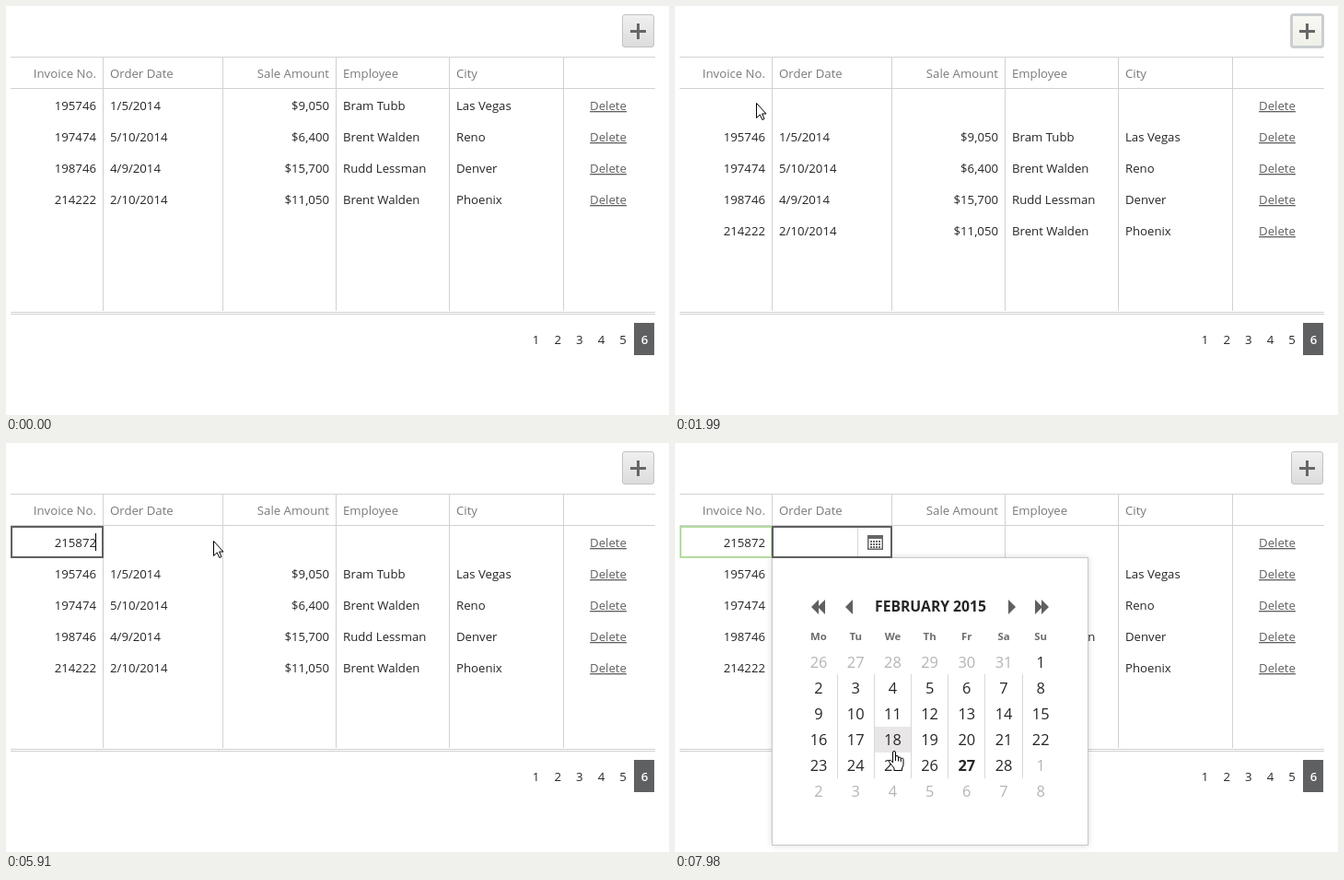
Animation, 720 px wide and 444 px high, one loop 8000 ms. Source, as an HTML page:

```html
<!DOCTYPE html>
<html lang="en">
<head>
<meta charset="utf-8">
<title>Invoice grid</title>
<style>
  html, body { margin: 0; width: 100%; height: 100%; overflow: hidden; background: #fff; }
  svg { display: block; width: 720px; height: 444px; cursor: default; }
  text { font: 13.2px "Open Sans", "Noto Sans", sans-serif; fill: #262626; white-space: pre; }
  .header { fill: #7a7a7a; }
  .link { fill: #5f6062; text-decoration: underline 1px; text-underline-offset: 1px; }
  .selected { fill: #fff; font-weight: 600; }
  .title { font-size: 15.7px; font-weight: 700; }
  .weekday { font-size: 11.4px; font-weight: 700; fill: #6d6d6d; }
  .day { font-size: 16.4px; }
  .other { fill: #b4b4b4; }
  .today { font-weight: 700; }
  .popup { filter: drop-shadow(0 0 3px rgba(0, 0, 0, .16)); }
</style>
</head>
<body>
<svg id="stage" viewBox="0 0 720 444">
  <defs>
    <linearGradient id="face" x2="0" y2="1">
      <stop stop-color="#f0f0f0"/><stop offset="1" stop-color="#dcdcdc"/>
    </linearGradient>
    <linearGradient id="faceHover" x2="0" y2="1">
      <stop stop-color="#f8f9f2"/><stop offset="1" stop-color="#eff0e8"/>
    </linearGradient>
  </defs>
</svg>
<script>
const LOOP = 8000;
const DARK = '#5f6062', LINE = '#d0d2d2';
const stage = document.getElementById('stage');

function add(parent, tag, attrs = {}, content) {
  const node = document.createElementNS('http://www.w3.org/2000/svg', tag);
  for (const key in attrs) node.setAttribute(key, attrs[key]);
  if (content !== undefined) node.textContent = content;
  return parent.appendChild(node);
}
const group = (parent = stage) => add(parent, 'g');
const box = (parent, x, y, width, height, fill, more) =>
  add(parent, 'rect', { x, y, width, height, fill, ...more });
const frame = (parent, x, y, width, height, stroke) =>
  box(parent, x + 1, y + 1, width - 2, height - 2, '#fff', { stroke, 'stroke-width': 2 });
const path = (parent, d, fill, more) => add(parent, 'path', { d, fill, ...more });
const label = (parent, x, y, content, anchor = 'start', cls = '') =>
  add(parent, 'text', { x, y, 'text-anchor': anchor, class: cls }, content);
const show = (node, visible) => node.setAttribute('display', visible ? 'inline' : 'none');

// Add button
const button = box(stage, 669.5, 9.5, 34, 35, 'url(#face)', { rx: 2.5 });
box(stage, 678, 26, 17, 3, '#666');
box(stage, 685, 19, 3, 17, '#666');

// Grid
const columns = [
  [98, 'end', 'Invoice No.'], [113, 'start', 'Order Date'], [351, 'end', 'Sale Amount'],
  [366, 'start', 'Employee'], [489, 'start', 'City'], [654, 'middle', '']
];
const orders = [
  ['195746', '1/5/2014', '$9,050', 'Bram Tubb', 'Las Vegas'],
  ['197474', '5/10/2014', '$6,400', 'Brent Walden', 'Reno'],
  ['198746', '4/9/2014', '$15,700', 'Rudd Lessman', 'Denver'],
  ['214222', '2/10/2014', '$11,050', 'Brent Walden', 'Phoenix']
];
for (const y of [55, 89, 332, 334]) box(stage, 5, y, 700, 1, LINE);
for (const x of [105, 235, 358, 481, 605]) box(stage, x, 55, 1, 276, LINE);
for (const [x, anchor, name] of columns) label(stage, x, 78, name, anchor, 'header');

const rows = group();
orders.forEach((order, r) => [...order, 'Delete'].forEach((value, c) =>
  label(rows, columns[c][0], 113 + 34 * r, value, columns[c][1], c === 5 ? 'link' : '')));
const newRowLink = label(stage, 654, 113, 'Delete', 'middle', 'link');

// Pager
box(stage, 682, 344, 22, 35, DARK);
for (let p = 1; p <= 6; p++)
  label(stage, 552 + 23.6 * p, 367, p, 'middle', p === 6 ? 'selected' : '');

// Calendar
const popup = group();
box(popup, 105.5, 124.5, 343, 312, '#fff', { stroke: '#c6c8c8', class: 'popup' });
label(popup, 277.5, 183, 'FEBRUARY 2015', 'middle', 'title');
const triangle = (x, dir) => path(popup, `M${x} 178l${8 * dir} -8v16z`, DARK);
[[148, 1], [155, 1], [185, 1], [370, -1], [399, -1], [406, -1]].forEach(t => triangle(...t));
const dayHover = box(popup, 0, 0, 40, 28, '#e9e6e8');
for (let c = 0; c < 7; c++) {
  const x = 156 + 40.2 * c;
  label(popup, x, 214, ['Mo', 'Tu', 'We', 'Th', 'Fr', 'Sa', 'Su'][c], 'middle', 'weekday');
  if (c) box(popup, Math.round(x - 20.7), 251, 1, 113, '#d8d8d8');
  for (let r = 0; r < 6; r++) {
    const date = new Date(2015, 0, 26 + c + 7 * r), day = date.getDate();
    const kind = date.getMonth() !== 1 ? ' other' : day === 27 ? ' today' : '';
    label(popup, x, 244 + 28 * r, day, 'middle', 'day' + kind);
  }
}

// Cell editors
const invoiceEditor = group();
const invoiceFocus = frame(invoiceEditor, 5, 90, 101, 35, DARK);
const invoiceValid = frame(invoiceEditor, 5, 90, 101, 35, '#b3dc9f');
const invoiceText = label(invoiceEditor, 98, 113, '', 'end');
const invoiceCaret = box(invoiceEditor, 97, 98, 1, 19, '#000');

const dateEditor = group();
frame(dateEditor, 105, 90, 131, 35, DARK);
box(dateEditor, 198, 92, 1, 31, '#d6d6d6');
box(dateEditor, 209.75, 100.75, 15.5, 14.5, '#fff', { stroke: '#666', 'stroke-width': 1.5 });
box(dateEditor, 209, 100, 17, 4, '#666');
for (let i = 0; i < 12; i++)
  box(dateEditor, 212 + 3 * (i % 4), 106 + 3 * Math.floor(i / 4), 2, 2, '#666');
const dateCaret = box(dateEditor, 113, 98, 1, 19, '#000');

// Mouse cursors, each drawn around its hot spot
const ink = { stroke: '#000', 'stroke-linejoin': 'round' };
const cursors = { arrow: group(), hand: group(), beam: group() };
path(cursors.arrow, 'M.5 .5V16.5L4.2 13L6.8 18.5L9 17.5L6.6 12H11Z', '#fff', ink);
path(cursors.hand, 'M-1.5 13V2a1.5 1.5 0 0 1 3 0V8V7a1.4 1.4 0 0 1 3 0v1.5a1.4 1.4 0 0 1 2.8 0v1' +
  'a1.3 1.3 0 0 1 2.7 0V15q0 2-1.5 4v2.5H0V19L-5.3 12.5q-.8-1.5.5-2.2 1.2-.4 3.3 2.7Z', '#fff', ink);
path(cursors.hand, 'M1.5 8v3M4.5 8.5v3M7.3 9.5v2.5', 'none', ink);
path(cursors.beam, 'M-3 -7.5h2.5l1 1l1 -1H4M.5 -6.5V7M-3 8h2.5l1 -1l1 1H4', 'none', { stroke: '#000' });

// start, end, from, to, vertical bow
const moves = [
  [630, 1120, [719, 209], [687, 24], 0],
  [1346, 2020, [687, 24], [88, 105], 34],
  [5190, 5970, [88, 105], [225, 106], 8],
  [6000, 6180, [225, 106], [219.5, 107], 0],
  [7470, 7980, [219.5, 107], [237.5, 334], 0]
];
const keyTimes = [3040, 3360, 3390, 3650, 3780, 4470];
const invoiceCaretTimes = [[2410, 2740], [3040, 4310], [4470, 4930], [5430, 6000]];
const dateCaretTimes = [[6180, 6480], [6710, 7490]];

const within = (t, spans) => spans.some(([from, to]) => t >= from && t < to);
const ease = p => p < .5 ? 4 * p ** 3 : 1 - 4 * (1 - p) ** 3;

function pointerAt(t) {
  const move = moves.filter(m => t >= m[0]).pop();
  if (!move) return null;
  const [start, end, from, to, bow] = move;
  const p = ease(Math.min(1, (t - start) / (end - start)));
  return [
    from[0] + (to[0] - from[0]) * p,
    from[1] + (to[1] - from[1]) * p + bow * 4 * p * (1 - p)
  ];
}

function cursorKind(t, [x, y]) {
  if (t < 2000) return x > 668 && y < 45 ? 'hand' : 'arrow';
  if (t < 6000) return t >= 2310 && x < 106 ? 'beam' : 'arrow';
  return y < 124 || y >= 224 ? 'hand' : 'arrow';
}

function render(t) {
  const pointer = pointerAt(t);
  const kind = pointer && cursorKind(t, pointer);
  for (const name in cursors) show(cursors[name], name === kind);
  if (pointer) cursors[kind].setAttribute('transform', `translate(${pointer.map(Math.round)})`);

  const active = t < 2150 && (t >= 1320 || kind === 'hand');
  button.setAttribute('fill', active ? 'url(#faceHover)' : 'url(#face)');
  button.setAttribute('stroke', active ? '#cbced0' : '#c2c2c2');
  button.setAttribute('stroke-width', active ? 3 : 1);

  const inserted = t >= 1320;
  rows.setAttribute('transform', `translate(0 ${inserted ? 34 : 0})`);
  show(newRowLink, inserted);

  show(invoiceEditor, t >= 2310);
  show(invoiceFocus, t < 6000);
  show(invoiceValid, t >= 6000);
  invoiceText.textContent = '215872'.slice(0, keyTimes.filter(k => t >= k).length);
  show(invoiceCaret, within(t, invoiceCaretTimes));

  show(dateEditor, t >= 6000);
  show(dateCaret, within(t, dateCaretTimes));
  show(popup, t >= 7010);

  const overDay = t >= 7470 && pointer[1] >= 224;
  show(dayHover, overDay);
  if (overDay) {
    dayHover.setAttribute('x', 136 + 40 * Math.floor((pointer[0] - 136) / 40));
    dayHover.setAttribute('y', 224 + 28 * Math.floor((pointer[1] - 224) / 28));
  }
}

function tick() {
  render(performance.now() % LOOP);
  requestAnimationFrame(tick);
}
tick();
</script>
</body>
</html>
```
